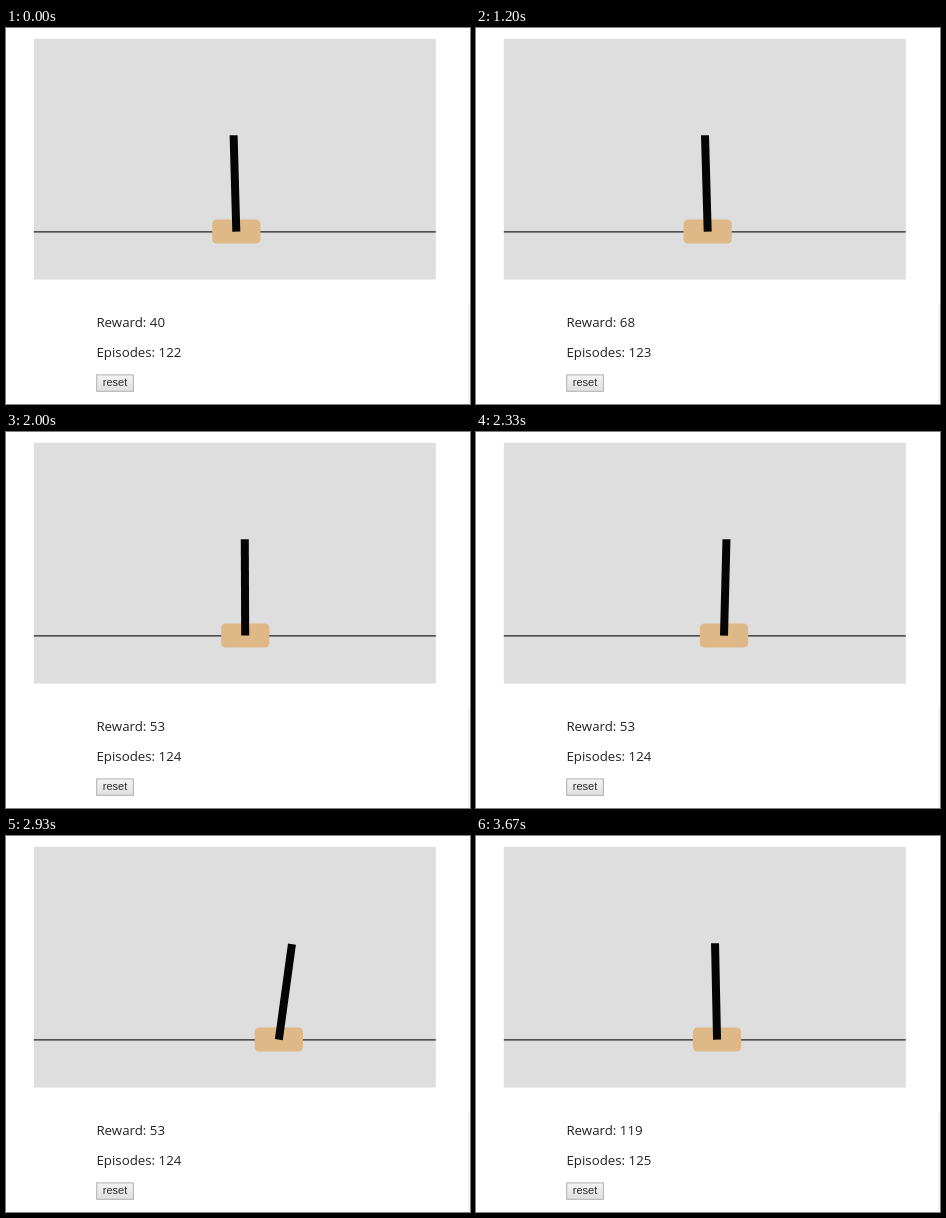
Recreate the animation shown at these times as an HTML page. Size 464 by 376 pixels, loop 3.74 s.

```html
<!DOCTYPE html>
<html lang="en">
<head>
<meta charset="utf-8">
<title>Cart and pole</title>
<style>
  html, body { margin: 0; width: 100%; height: 100%; overflow: hidden; background: #fff; }
  svg { display: block; width: 464px; height: 376px; }
  .label { font: 13.3px "Open Sans", "Noto Sans", sans-serif; fill: #222; }
  .button { font: 11px "Liberation Sans", Arial, sans-serif; fill: #2c2c2c; }
</style>
</head>
<body>
<svg viewBox="0 0 464 376">
  <defs>
    <linearGradient id="face" x2="0" y2="1">
      <stop offset="0" stop-color="#f4f4f4"/>
      <stop offset="1" stop-color="#dfdfdf"/>
    </linearGradient>
    <linearGradient id="shade">
      <stop offset="0" stop-color="#000" stop-opacity="0"/>
      <stop offset="1" stop-color="#000" stop-opacity=".06"/>
    </linearGradient>
  </defs>
  <rect x="27.8" y="10.8" width="402" height="240.8" fill="#dedede"/>
  <path d="M27.8 203.8H429.8" stroke="#222" stroke-width="1.2"/>
  <g id="cart">
    <rect x="-24.1" y="191.5" width="48.2" height="24" rx="4.5" fill="#deb887"/>
    <rect id="pole" x="-4" y="107.2" width="8" height="96.4" fill="#050505"/>
  </g>
  <text class="label" x="90.4" y="299" id="reward"></text>
  <text class="label" x="90.4" y="329" id="episodes"></text>
  <rect x="90.7" y="346.9" width="36.7" height="16.4" fill="url(#face)" stroke="#b0b0b0"/>
  <text class="button" x="109" y="358" text-anchor="middle">reset</text>
  <rect x="461" y="276" width="3" height="100" fill="url(#shade)"/>
</svg>
<script>
const LOOP = 3740, TICK = 200 / 3;
const STEP = 13; // ms per simulation step
const $ = id => document.getElementById(id);

// The cart drifts at a steady speed, then lurches as the pole falls.
// x in px, lean in degrees, drift and sway per second.
const runs = [
  { steps: 68, x: 230.3, drift: -28.3, lurch: -3, lean: -1.6, sway: 5.9, fall: -12 },
  { steps: 53, x: 230, drift: 8.7, lurch: -24, lean: 0.5, sway: -5.5, fall: -8 },
  { steps: 119, x: 229, drift: 23.6, lurch: 20, lean: -2, sway: 4, fall: 7.4 },
  { steps: 100, x: 225.8, drift: 27.7, lurch: 0, lean: 1.5, sway: -4.9, fall: 0 }
];

// Start of the display step that holds time t, on a 10 ms grid
function stepTime(t) {
  const start = n => Math.round(n * TICK / 10) * 10;
  let n = Math.ceil(t / TICK) + 1;
  while (start(n) > t) n--;
  return start(n);
}

function draw(now) {
  let ms = stepTime(now % LOOP), i = 0, reward = 40;
  while (ms >= runs[i].steps * STEP) {
    reward = runs[i].steps;
    ms -= reward * STEP;
    i++;
  }
  const run = runs[i], s = ms / 1000;
  const end = (ms / (run.steps * STEP)) ** 4;
  const x = run.x + run.drift * s + run.lurch * end;
  const tilt = run.lean + run.sway * s + run.fall * end;
  $("cart").setAttribute("transform", `translate(${x} 0)`);
  $("pole").setAttribute("transform", `rotate(${tilt} 0 203.5)`);
  $("reward").textContent = `Reward: ${reward}`;
  $("episodes").textContent = `Episodes: ${122 + i}`;
}

const begin = performance.now();
function loop() {
  draw(performance.now() - begin);
  requestAnimationFrame(loop);
}
loop();
</script>
</body>
</html>
```
